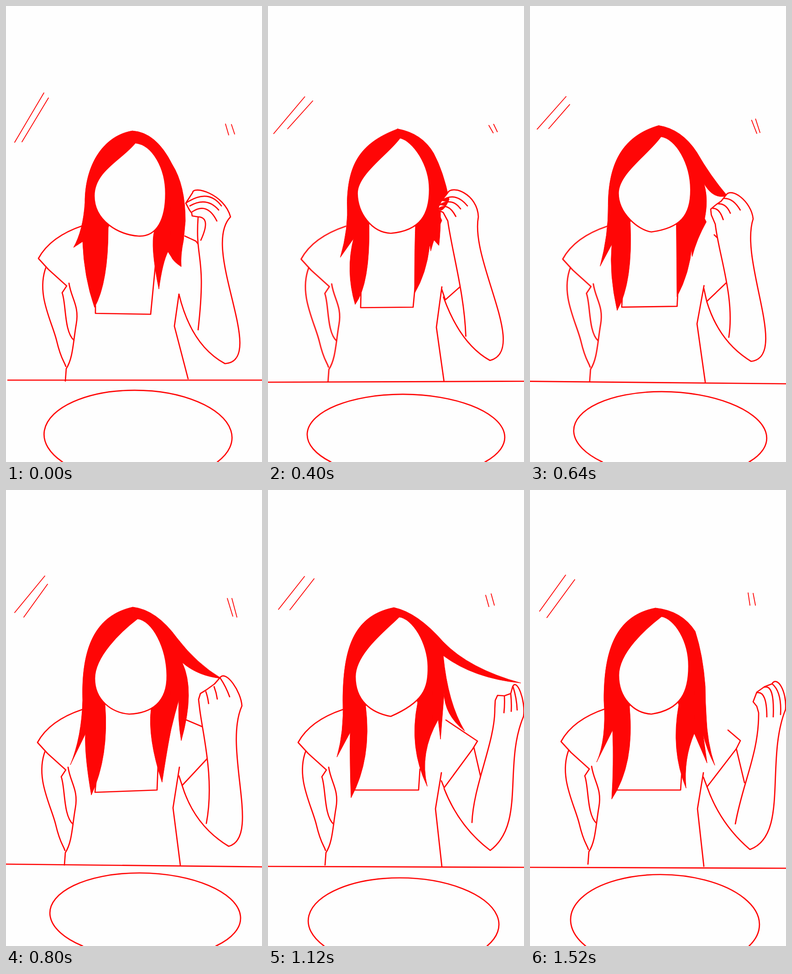
Write an HTML page without scripts that moves like this. It is 561 px wide and 997 px high and loops after 1.6 s.

```html
<!DOCTYPE html>
<html lang="en">
<head>
<meta charset="utf-8">
<title>Hair twirl</title>
<style>
:root { --ink: #ff0606; --paper: #fefefe; }
html, body { margin: 0; width: 100%; height: 100%; overflow: hidden; background: var(--paper); }
svg { display: block; width: 100%; height: 100%; }

/* Poses are keyframes; steps() holds every in-between drawing for 80 ms. */
path {
  fill: none; stroke: var(--ink); stroke-width: 2.7;
  stroke-linecap: round; stroke-linejoin: round;
  animation: 1.6s steps(4) infinite;
}
.marks { stroke-width: 1.8; animation-name: marks; }
.table { animation-name: table; }
.body { animation-name: body; }
.front { animation-name: front; }
.sleeve { animation-name: sleeve; }
.hair { fill: var(--ink); stroke-width: 1; }
.left { animation-name: left; }
.right { animation-name: right; }
.lock { animation-name: lock; }
.face, .arm { fill: var(--paper); }
.face { animation-name: face; }
.arm { animation-name: arm; }
.thumb { animation-name: thumb; animation-timing-function: steps(3); }

@keyframes marks {
  0% { animation-timing-function: steps(3); d: path("M83 190 19 298M93 201 35 297M481 258 488 282M494 259 501 280"); }
  15% { d: path("M85 194 11 288M111 195 44 274M482 266 490 275M495 265 502 274"); }
  35% { animation-timing-function: steps(3); d: path("M76 203 14 270M85 220 42 263M486 256 497 280M494 252 503 276"); }
  50% { d: path("M85 188 19 268M91 206 39 278M485 237 497 276M495 237 506 278"); }
  70% { animation-timing-function: steps(3); d: path("M80 189 23 261M101 194 48 262M477 230 484 255M489 227 496 252"); }
  85%, to { d: path("M78 186 21 265M98 196 37 279M478 225 482 252M489 226 494 252"); }
}
@keyframes table {
  0% { animation-timing-function: steps(3); d: path("M4 818 561 818M124 997A206 100 1.3 1 1 463 997"); }
  15% { d: path("M0 823 561 814M122 997A220 89 -1.3 1 1 461 997"); }
  35% { animation-timing-function: steps(3); d: path("M0 822 561 827M154 997A213 93 3.2 1 1 490 997"); }
  50% { d: path("M0 818 561 824M168 997A209 93 1.9 1 1 460 997"); }
  70% { animation-timing-function: steps(3); d: path("M0 823 561 825M123 997A209 98 1.4 1 1 480 997"); }
  85%, to { d: path("M0 825 561 827M122 997A207 104 1.9 1 1 480 997"); }
}
@keyframes body {
  0% { animation-timing-function: steps(3); transform: translate(1px, 0); }
  15% { transform: translate(2px, 1px); }
  35% { animation-timing-function: steps(3); transform: translate(3px, 2px); }
  50% { transform: translate(-1px, 0); }
  70% { animation-timing-function: steps(3); transform: translate(-4px, 0); }
  85%, to { transform: translate(-2px, -2px); }
}
@keyframes front {
  0% { animation-timing-function: steps(3); d: path("M196 655 196 672 317 674 328 560M379 630 369 700 399 815"); }
  15% { d: path("M203 595 202 662 318 660 326 588M380 614 372 710 386 815"); }
  35% { animation-timing-function: steps(3); d: path("M205 632 204 657 318 657 320 624M382 614 366 695 385 823"); }
  50% { d: path("M197 640 195 661 331 656 333 605M380 606 366 695 382 820"); }
  70%, to { d: path("M192 645 188 656 330 656 333 610M380 618 367 697 381 823"); }
}
@keyframes sleeve {
  0% { animation-timing-function: steps(3); d: path("M392 503 416 514 440 545 440 640 440 650M445 565 445 630"); }
  15% { d: path("M410 500 430 545 418 613 389 639 380 626M435 565 440 630"); }
  35% { animation-timing-function: steps(3); d: path("M410 500 440 545 427 612 388 646 382 614M445 565 450 630"); }
  50% { d: path("M391 501 455 528 444 584 386 646 379 625M455 565 455 630"); }
  70%, 85% { animation-timing-function: steps(2); d: path("M390 503 459 549 448 567 386 651 380 636M451 562 468 636"); }
  95%, to { d: path("M434 525 461 548 452 566 388 649 380 628M452 565 470 640"); }
}
@keyframes left {
  0% { animation-timing-function: steps(3); d: path("M224 485Q224 605 194 659Q171 593 168 515L148 528Q169 491 173 430C173 345 215 283 277 273L280 330Z"); }
  15% { d: path("M222 478Q222 600 189 640Q165 569 193 502L157 546Q179 492 174 430C177 345 200 308 286 273L280 330Z"); }
  35% { animation-timing-function: steps(3); d: path("M221 475Q226 615 193 665Q174 590 182 515L160 553Q175 481 173 425C175 345 205 290 284 264L280 330Z"); }
  50% { d: path("M217 468Q226 583 187 667Q172 580 174 533L141 601Q166 540 168 460C165 350 192 275 278 256L280 330Z"); }
  70% { animation-timing-function: steps(3); d: path("M214 473Q228 587 182 673Q179 598 180 530L151 584Q167 528 164 460C165 350 185 275 276 257L280 330Z"); }
  85%, to { d: path("M218 474Q230 600 179 676Q184 600 181 525L146 595Q168 545 162 460C162 355 185 275 275 258L280 330Z"); }
}
@keyframes right {
  0% { animation-timing-function: steps(3); d: path("M277 273Q329 276 364 346Q393 392 393 470Q391 492 389 512Q382 545 384 570Q366 558 362 548L358 542 355 537Q343 560 335 619Q316 525 325 492L280 330Z"); }
  15% { d: path("M283 273Q342 284 365 326Q386 358 382 430Q381 460 377 500Q372 545 380 577Q366 555 361 541L359 535 357 526Q346 575 330 623Q315 530 324 486L280 330Z"); }
  35% { animation-timing-function: steps(3); d: path("M284 264Q334 273 361 318Q383 366 412 416Q393 433 379 394Q385 435 369 470Q367 475 365 480L356 503 351 525Q348 595 312 634Q327 547 322 480L280 330Z"); }
  50% { d: path("M278 256Q330 262 375 324Q418 380 472 412Q421 407 386 377Q415 438 384 548Q376 500 379 458L370 490 362 522Q354 560 342 639Q310 542 318 478L280 330Z"); }
  70% { animation-timing-function: steps(3); d: path("M276 257Q328 268 384 332Q441 391 554 422Q451 412 384 362Q394 466 431 527Q386 491 386 443L378 545 373 502Q331 575 349 648Q308 564 328 465L280 330Z"); }
  85% { animation-timing-function: steps(2); d: path("M275 258Q333 264 372 321Q397 418 496 516Q412 490 380 403Q376 502 408 554Q388 535 378 517L381 588 359 532Q336 588 342 652Q308 569 326 470L280 330Z"); }
  95%, to { d: path("M275 258Q333 264 362 309Q379 361 384 430Q384 460 386 490Q388 554 405 602Q388 570 379 533L388 597 360 532Q336 588 342 652Q308 569 326 470L280 330Z"); }
}
@keyframes lock {
  0%, 15%, 50%, to { d: path("M360 440L365 460Q365 480 360 500Q355 470 360 440Z"); }
  35% { animation-timing-function: steps(3); d: path("M382 453L397 478Q365 525 353 572Q344 498 382 453Z"); }
}
@keyframes face {
  0% { animation-timing-function: steps(3); d: path("M283 299C322 303 350 355 350 410S332 505 290 503C248 501 193 470 193 415S255 335 283 299Z"); }
  15% { d: path("M292 289C318 298 356 350 356 402S335 498 274 498C213 498 200 455 198 412S268 312 292 289Z"); }
  35% { animation-timing-function: steps(3); d: path("M286 287C320 291 352 345 352 400S335 484 264 496C240 492 193 450 193 408S265 330 286 287Z"); }
  50% { d: path("M288 281C322 285 352 345 353 405S318 488 270 490C232 487 194 460 194 412S250 310 288 281Z"); }
  70% { animation-timing-function: steps(3); d: path("M287 277C318 280 350 335 351 385S340 464 269 495C225 487 191 460 191 408S262 303 287 277Z"); }
  85%, to { d: path("M288 276C318 281 348 330 348 385S332 480 266 490C228 488 194 455 194 405S254 302 288 276Z"); }
}
@keyframes arm {
  0% { animation-timing-function: steps(3); d: path("M379 630Q406 742 480 782C575 775 425 530 492 461C478 410 410 392 409 408L394 431 402 446 407 453 408 459 421 461C414 560 440 540 421 708M394 431Q443 398 472 437M403 437Q440 416 466 446M408 450Q441 428 462 470"); }
  15% { d: path("M381 627Q428 743 490 774C570 735 435 560 447 460C448 400 385 385 378 402L358 427 358 438 363 447 383 447 391 462C403 530 416 620 433 722M358 427Q395 395 428 431M360 436Q393 410 417 436M363 446Q386 417 410 453"); }
  35% { animation-timing-function: steps(3); d: path("M388 646Q415 735 483 776C572 770 450 555 475 462C470 420 420 395 409 416L400 428 391 434 381 444 385 456 397 478C405 550 445 640 434 722M402 425Q426 414 446 443M392 434Q414 426 427 451M382 443Q402 437 413 467"); }
  50% { d: path("M386 646Q413 734 488 779C560 760 475 565 517 472C515 440 483 395 470 409L457 424 439 437 426 445 422 458 424 475C430 530 458 630 439 729M470 412Q482 430 490 452M456 430Q461 443 463 457M438 441Q442 452 444 467"); }
  70% { animation-timing-function: steps(3); d: path("M386 653Q419 737 487 788C565 730 515 600 560 495C565 460 545 410 536 430L532 445 518 450 503 449 498 460 497 478C498 550 450 645 447 727M537 430Q545 455 546 481M532 446Q534 465 533 484M518 451Q519 470 517 487"); }
  85%, to { d: path("M388 649Q417 731 482 786C568 755 515 590 560 480C563 440 542 405 530 424L514 430 497 442 489 463 497 473 501 487C502 575 466 640 450 730M531 424Q552 442 549 491M514 431Q536 425 533 496M498 443Q519 440 519 496"); }
}
@keyframes thumb {
  0% { visibility: visible; d: path("M421 461Q450 462 427 512"); }
  15%, to { visibility: hidden; d: path("M391 462Q394 480 396 500"); }
}
</style>
</head>
<body>
<svg viewBox="0 0 561 997" preserveAspectRatio="none">
  <path class="marks"/>
  <path class="table"/>
  <path class="body" d="M168 480Q96 504 70 552L92 576 132 612 122 627C131 650 126 712 148 731M137 606C142 640 160 655 153 695S146 770 131 793L129 820M87 570C64 630 100 690 110 732S126 775 130 788"/>
  <path class="front"/>
  <path class="sleeve"/>
  <path class="hair left"/>
  <path class="hair right"/>
  <path class="hair lock"/>
  <path class="face"/>
  <path class="arm"/>
  <path class="thumb"/>
</svg>
</body>
</html>
```
